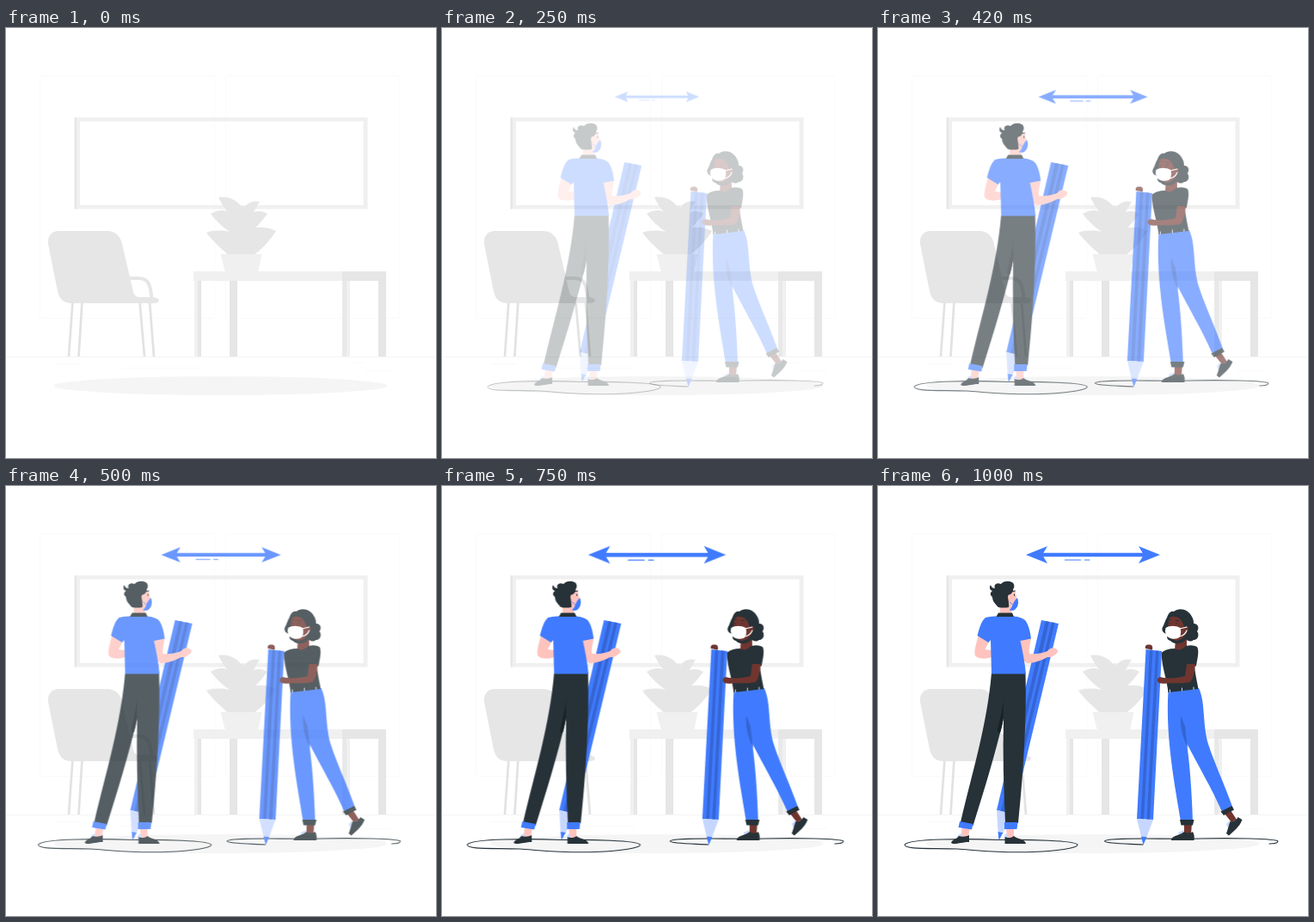
Recreate the animation shown at these times as an HTML page without scripts. Size 500 px wide and 500 px high, loop 1.04 s.

```html
<!DOCTYPE html>
<html lang="en">
<head>
<meta charset="utf-8">
<title>Keeping distance</title>
<style>
  html, body { margin: 0; width: 100%; height: 100%; overflow: hidden; background: #fff; }
  svg { display: block; width: 100%; height: 100%; }

  .actors { animation: gate 1040ms step-end infinite; }
  .enter { animation: enter 1040ms infinite; transform-origin: 250px 80px; }
  .arrow { --from: scale(.5); }
  .man { --from: translateX(30px); }
  .woman { --from: translateX(-30px); }

  @keyframes gate {
    0% { visibility: hidden; }
    12.5%, 100% { visibility: visible; }
  }
  @keyframes enter {
    0% {
      opacity: 0;
      transform: var(--from);
      animation-timing-function: cubic-bezier(.33, -.01, .48, 1.39);
    }
    96.15%, 100% { opacity: 1; transform: none; }
  }

  .g1 { fill: #f0f0f0; }
  .g2 { fill: #e6e6e6; }
  .blue { fill: #407bff; }
  .deep { fill: #3565d3; }
  .pale { fill: #c6d7ff; }
  .ink { fill: #263238; }
  .dark { fill: #182126; }
  .peach { fill: #ffc3bd; }
  .brown { fill: #70352f; }
  .white { fill: #fff; }
  .line { fill: none; stroke-linecap: round; stroke-linejoin: round; }
  .loop { stroke: #263238; stroke-width: 1.1; }
</style>
</head>
<body>
<svg viewBox="0 0 500 500" preserveAspectRatio="none">
  <defs>
    <g id="head"><path d="M172 80L197 70L191 80L197 90Z"/></g>
  </defs>

  <!-- room -->
  <g class="line" stroke="#fafafa">
    <rect x="39.500" y="55.500" width="203" height="282" rx="3"/>
    <rect x="255.500" y="55.500" width="202" height="282" rx="3"/>
    <path d="M135 395.500H225M57 390.500H88M400 389.500H416M417 398.500H448"/>
    <path d="M0 382.500H500" stroke="#f5f5f5"/>
  </g>
  <path class="g1" fill-rule="evenodd" d="M80 104H420.500V210.500H80ZM86 108.500V206H415.500V108.500Z"/>
  <path class="g2" d="M79.500 104H82V210.500H79.500Z"/>

  <!-- chair -->
  <g class="line" stroke="#e2e2e2" stroke-width="2.700" style="stroke-linecap:butt">
    <path d="M77.500 318L73 382M88.500 318L84.500 382M155.500 318L161 382M167 318L172 382"/>
    <path d="M142 291H154C166 291 168 299 169.500 315" stroke="#e6e6e6" stroke-width="4"/>
  </g>
  <path class="g2" d="M49 251C48 242 53 236 62 236H117C127 236 133 242 135 251L148 307C149 312 153 313 157 313H172Q178 314 178 317Q177 320 172 320H76C67 320 62 315 60 306Z"/>

  <!-- table -->
  <path class="g1" d="M218 283H392V294H218ZM219 294H224V382H219ZM395 294H400V382H395Z"/>
  <path class="g2" d="M391 283H442V382H433V294H391ZM260 294H269V382H260ZM223 294H227V382H223Z"/>
  <path fill="#e9e9e9" d="M391 294H396V382H391Z"/>

  <!-- plant -->
  <path class="g2" d="M259 264C250 257 240 247 233 238C241 235 251 235 260 237C251 231 244 224 238 216C245 212 251 211 257 213C253 208 250 203 247 197C258 195 268 200 273 207L276 207L277 209C281 203 287 200 295 202C292 206 290 210 288 214C294 212 299 213 304 216C299 222 295 228 290 232C298 231 307 232 314 236C307 247 298 257 288 264Z"/>
  <path class="g1" d="M249.500 263H297.500L293 284H255Z"/>

  <ellipse cx="249.500" cy="416" rx="194" ry="11" fill="#f5f5f5"/>

  <g class="actors">
    <g class="enter arrow blue">
      <use href="#head"/>
      <use href="#head" transform="matrix(-1 0 0 1 500 0)"/>
      <path d="M188 77.700H312V82.300H188Z"/>
      <path class="line" stroke="#407bff" stroke-width="1.200" d="M217.500 86H235.500M240.500 86H246"/>
    </g>

    <g class="enter man">
      <path class="line loop" d="M140 411.500C104 410 36 410 31 417C31 423 60 421 92 422C120 424 145 427 180 425.500C210 424 233 421 232 417C229 412 175 411 140 411.500"/>
      <!-- pencil -->
      <path class="blue" d="M190 156L210 160L157 381L138 377Z"/>
      <path class="deep" d="M195 157L199 158L147 379L143 378ZM202 158.500L205.500 159L153 380L149.500 379.500Z"/>
      <path class="pale" d="M138 377L157 381L145.500 403L139.500 402Z"/>
      <path class="blue" d="M139.500 402L145.500 403L140.500 412Z"/>
      <!-- feet -->
      <path class="peach" d="M98 396H107L105 409H96ZM149 397H158V409H150Z"/>
      <path class="pale" d="M94 405L98 404L97 408L92 409ZM147 406L150 404L152 409H148Z"/>
      <path class="ink" d="M85 415C86 411 91 411 94 407C98 408 102 408 106 406V414C99 414 95 416 87 416ZM147.500 408C151 410 156 409 158 407C162 411 171 410 172 416H147.500Z"/>
      <!-- trousers -->
      <path class="ink" d="M132 217H171.500C173 270 169 335 163 392H148C146 350 145 310 146 270C137 310 123 355 110.500 395L96 391C109 335 127 278 132 217Z"/>
      <path class="dark" d="M146 248C145 260 142 270 139 284C141 291 143 287 145.500 272Z"/>
      <path class="blue" d="M95 390L110.500 393L109 399.500L93.500 397ZM147 391H162.500L161.500 399H147Z"/>
      <!-- arms -->
      <path class="peach" d="M117 173L129 181L124.500 190L132 191V199C124 202 114 201 112.500 196C112 190 115 180 117 173ZM165 178L178 177C177 184 175 190 176 195C184 196 192 194 197 192C199 189 204 187 206 189C210 190 210 194 206 196C203 199 200 199 197 199C190 203 181 206 174 206C168 205 168 197 165 178Z"/>
      <!-- shirt -->
      <path class="blue" d="M125 153Q131 151 138 151.500H158Q166 152 171 156C175 161 177 169 178 177.500L165.500 180C168 192 171 206 172 218.500H132L131 179L128.500 182L115.500 174C118 165 120 157 125 153Z"/>
      <!-- head -->
      <path class="peach" d="M142 137L155 138V149H142ZM148 124L159 121L161.500 131L160 142L150 143Z"/>
      <path class="ink" d="M137.500 152L140 147.500H156L158 152ZM140 141C135 136 133 133 133 129C130 127 130 124 133 122C130 121 129 118 131 115C132 118 134 119 136 119C134 114 139 112 143 114C146 110 152 110 156 112C159 114 159 118 157 120C158 122 156 124 155 125C153 126 154 130 152 131C151 135 153 138 152 141Q146 142 140 141Z"/>
      <ellipse class="peach" cx="154" cy="131" rx="2.700" ry="5" transform="rotate(-15 154 131)"/>
      <path class="blue" d="M162 130C164 135 163 140 160 143C158 145.500 154 145 152.500 144C157 142 156 135 162 130Z"/>
      <path class="line" stroke="#407bff" stroke-width=".8" d="M153 135L158 139"/>
      <path class="line" stroke="#263238" d="M157.500 122.500L159.500 122M158.500 126V127.500"/>
    </g>

    <g class="enter woman">
      <path class="line loop" d="M308 417C292 416 265 416 263.500 413C266 408 330 411 375 410C410 409 462 410 465 413C465 415 460 416 455 416"/>
      <!-- feet -->
      <path class="brown" d="M356 392H365L364 405H356ZM403 381L410 377L417 388L411 391Z"/>
      <path class="pale" d="M349 403L356 400L355 404L350 406ZM405 393L409 389L410 394L407 398Z"/>
      <path class="ink" d="M341 411C343 406 352 406 356 402C359 404 363 404 366 402C368 405 368 409 367.500 412H341ZM405 404C407 399 408 394 409.500 390C414 391 417 388 418.500 385L423.500 388C420 397 414 401 408 406.500Z"/>
      <!-- jeans -->
      <path class="blue" d="M337.500 238L373 235C381 252 377 276 384 300C391 322 403 347 412.500 374L400.500 380C389 353 371 323 359 299C363 327 365 359 366 390H352C346 352 334 294 337.500 238Z"/>
      <path class="deep" d="M352 267C351 280 354 292 360.500 305C358 293 358 285 357 279Z"/>
      <path class="ink" d="M351 388H367.500L366 394.500H352.500ZM398.500 378.500L411.500 372L414 376.500L402 383Z"/>
      <!-- shirt -->
      <path class="brown" d="M346 176H359V192H345Z"/>
      <path class="ink" d="M329.500 194Q335 189 345 189Q351 193 358 186Q366 184 371 187C374 192 371 202 370 209L368 210C369 219 371 228 372.500 236L337.500 240C336 225 330 211 329.500 194Z"/>
      <path class="line" stroke="#c6d7ff" d="M339.500 237V240M353.500 235V238M367 234V236.500"/>
      <!-- pencil -->
      <path class="blue" d="M311.500 190L330 192L320 388L301 387Z"/>
      <path class="deep" d="M316 190.500L319.500 191L309 387.500L305.500 387ZM323 191.500L326.500 191.800L316 388L312.500 387.700Z"/>
      <path class="pale" d="M301 387L320 388L312.500 408L306 407.500Z"/>
      <path class="blue" d="M306 407.500L312.500 408L308.500 417.500Z"/>
      <!-- arms -->
      <path class="brown" d="M311 189C310 185 313 184 315 184.500C318 184 320 186 319 190.500ZM359 207H369C368 214 368 222 363 228C354 230 343 229 336 229.500C331 230 326 230 325 227C324 223 328 221 332 223C341 224 350 223 357 221Z"/>
      <!-- head -->
      <path class="ink" d="M336 153C338 147 341 145 344 146C350 141 361 143 365 152C367 155 367 158 367 160C372 160 374 165 371 169C374 173 372 179 367 179C363 182 360 180 358 178C355 184 345 185 340 180C335 179 336 174 337 172C332 172 329 168 331 164C333 161 333 158 336 153Z"/>
      <path class="brown" d="M338 158C338 153 341 151 345 152C350 152 354 156 356 164C360 161 363 166 359 170C357 175 353 179 347 180C340 179 336 170 338 158Z"/>
      <path class="white" d="M334.500 165C339 162 346 162 351.500 165C353 170 352 175 349 177C343 179 337 177 335 173Q333 169 334.500 165Z"/>
      <path class="line" stroke="#fff" stroke-width="1.200" d="M351 166L359 164M350.500 175C355 174 358 171 359 168"/>
      <path class="line" stroke="#263238" stroke-width=".9" d="M338.500 156L341 155M346 156L350 157M339.500 159.500V160.500M347 159.500V160.500"/>
    </g>
  </g>
</svg>
</body>
</html>
```
